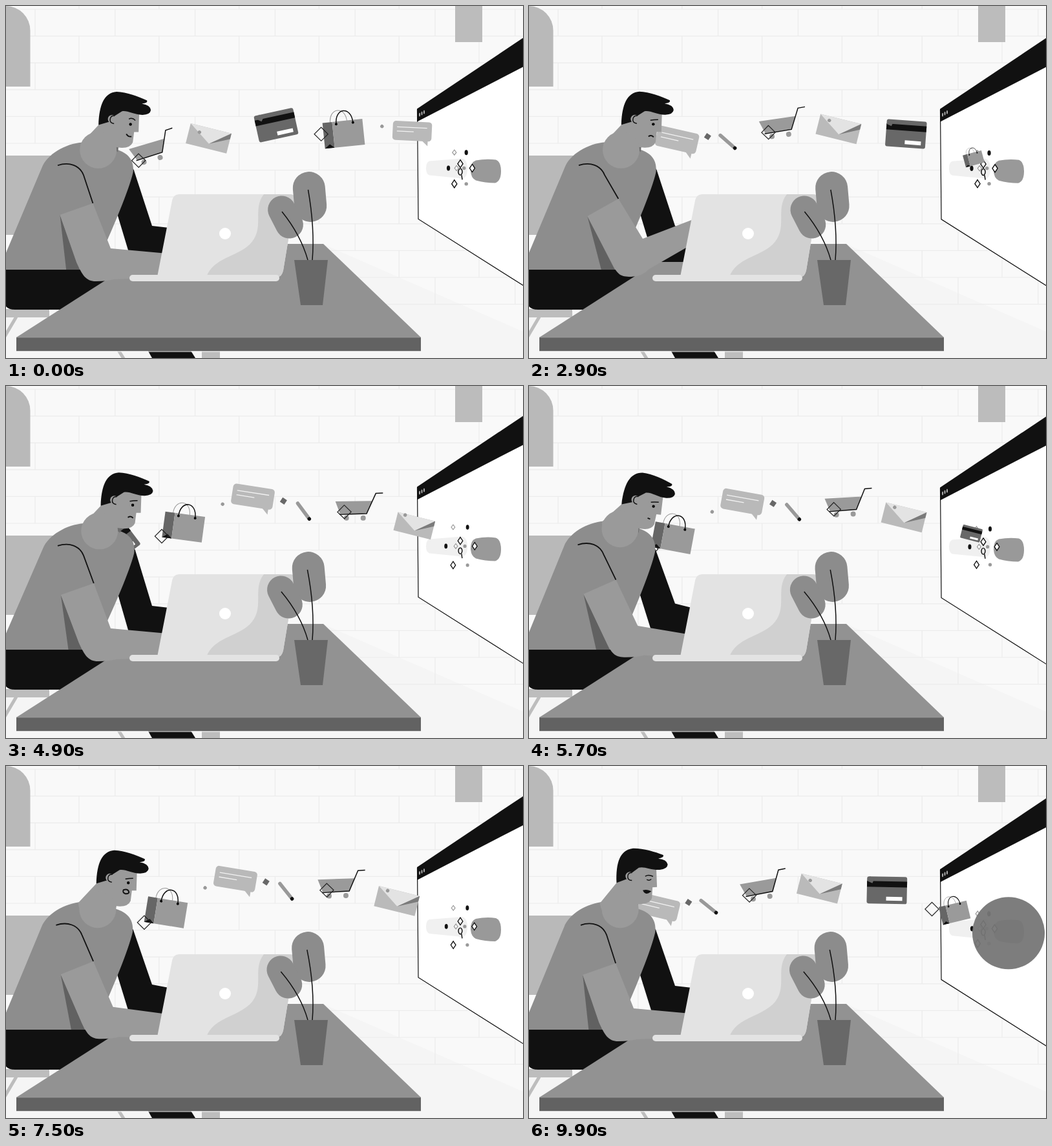
Recreate the animation shown at these times as an HTML page. Size 800x546 px, loop 10000 ms.

```html
<!DOCTYPE html>
<html lang="en">
<head>
<meta charset="utf-8">
<title>Shopping online</title>
<style>
html, body { margin: 0; width: 100%; height: 100%; overflow: hidden; background: #f9f9f9; }
svg { display: block; width: 800px; height: 546px; }
.ink { fill: none; stroke: #111; stroke-width: 1.5; }
.skin { fill: #9a9a9a; }
.shirt { fill: #8d8d8d; }
.leaf { fill: #8c8c8c; }
#mouth { stroke-width: 1.9; }
#mouth.grin { fill: #111; }
</style>
</head>
<body>
<svg viewBox="0 0 800 546">
  <defs>
    <g id="cart">
      <path d="M-37-8L20-11 12 9-29 11Z" fill="#9a9a9a"/>
      <path class="ink" d="M-30 12L12 9 25-23 36-24"/>
      <circle cx="-19" cy="17" r="4" fill="#9a9a9a"/><circle cx="7" cy="16" r="4" fill="#9a9a9a"/>
    </g>
    <g id="envelope">
      <path d="M-32-16H33V16H-32Z" fill="#bababa"/>
      <path d="M-32-16H33L3 8Z" fill="#e3e3e3"/>
      <path d="M33-16L3 8 33-7Z" fill="#7b7b7b"/>
    </g>
    <g id="card">
      <rect x="-31" y="-21" width="62" height="42" rx="3" fill="#686868"/>
      <path d="M-31-14H31V-5H-31Z" fill="#111"/>
      <path d="M-1 10H24V16H-1Z" fill="#fff"/>
    </g>
    <g id="bag">
      <path d="M-19-14C-19-38 7-38 7-14" fill="none" stroke="#999"/>
      <path d="M-31-15H-16V25H-31Z" fill="#666"/>
      <path d="M-16-15H31V25H-16Z" fill="#9a9a9a"/>
      <path d="M-31 25L-23 19-16 25Z" fill="#111"/>
      <path class="ink" d="M-10-11C-10-37 16-37 16-11"/>
      <circle cx="-10" cy="-11" r="2"/><circle cx="16" cy="-11" r="2"/>
    </g>
    <g id="bubble">
      <rect x="-33" y="-17" width="65" height="32" rx="5" fill="#b9b9b9"/>
      <path d="M16 14H26V23Z" fill="#b9b9b9"/>
      <path d="M-26-7H24M-26 0H2" stroke="#f2f2f2" stroke-width="1.3"/>
    </g>
    <g id="pencil">
      <path d="M-15 0H12" stroke="#999" stroke-width="5.5" stroke-linecap="round"/>
      <circle cx="15" r="2.8" fill="#111"/>
    </g>
    <rect id="square" x="-7.5" y="-7.5" width="15" height="15" fill="none" stroke="#222" stroke-width="1.2"/>
    <rect id="chip" x="-4" y="-4" width="8" height="8" fill="#686868"/>
    <circle id="dot" r="2.7" fill="#999"/>
    <path id="gem" d="M0-6L4 0 0 6-4 0Z" fill="#fff" stroke="#111" stroke-width="1.4"/>
    <path id="paleGem" d="M0-4L3 0 0 4-3 0Z" fill="#fff" stroke="#999" stroke-width="1.2"/>
    <ellipse id="bean" rx="2.6" ry="4" fill="#111"/>
    <path id="loop" class="ink" d="M0-6A3 5 0 1 1-.1-6M2 4L3 11"/>
  </defs>

  <rect width="800" height="546" fill="#f9f9f9"/>
  <path d="M490 369L800 505V546H0V475H600Z" fill="#f5f5f5"/>
  <path id="bricks" fill="none" stroke="#ececec" stroke-width="1.2"/>
  <path d="M0 0A37.500 38 0 0 1 37.500 38V125H0Z" fill="#b9b9b9"/>
  <path d="M695 0V56H737V0Q735-6 716-6T695 0Z" fill="#bcbcbc"/>
  <path d="M0 232H75Q82 232 82 240V355H0Z" fill="#b9b9b9"/>

  <g id="screen">
    <path d="M636.500 180L800 95V435L638 332Z" fill="#fff"/>
    <path d="M636 161L800 51V96L636 181Z" fill="#111"/>
    <path class="ink" style="stroke-width:1.2" d="M636.500 162L638 332 802 436"/>
    <g fill="#aaa"><ellipse cx="640" cy="170" rx="1.1" ry="3"/><ellipse cx="643.500" cy="168" rx="1.1" ry="3"/><ellipse cx="647" cy="166" rx="1.1" ry="3"/></g>
    <path d="M655 242L706 238Q714 240 714 254T706 269L655 264Q650 262 650 253T655 242Z" fill="#f0f0f0"/>
    <path d="M727 241Q743 238 758 240 766 243 766 258T757 276Q741 276 727 272 719 268 719 256T727 241Z" fill="#999"/>
    <g id="sparks"></g>
    <circle id="disc" cx="742" cy="260" fill="#777" opacity=".95"/>
  </g>
  <g id="stream"></g>

  <path d="M16 482L-4 516" stroke="#bdbdbd" stroke-width="5"/>
  <path d="M174 534L184 550" stroke="#bdbdbd" stroke-width="5"/>
  <path d="M0 470H67V483H0Z" fill="#bdbdbd"/>
  <path d="M303 530H331V546H303Z" fill="#bdbdbd"/>
  <path d="M217 530H283L293 546H226Z" fill="#111"/>
  <path d="M0 409H185L120 471H14Q4 471 0 466Z" fill="#111"/>
  <path d="M16 514L242 369H491L642 514Z" fill="#929292"/>
  <path d="M16 514H642V535.500H16Z" fill="#626262"/>
  <path d="M16 514H642" stroke="#a2a2a2" stroke-width=".7"/>
  <path d="M16 536H642" stroke="#fff"/>

  <path id="backArm" fill="#111"/>
  <path id="torso" class="shirt" d="M-11 409L55 250C63 230 90 213 118 211L170 222C190 228 198 240 196 258C190 285 165 345 150 378V409Z"/>
  <path id="shade" fill="#616161"/>
  <g id="head">
    <path d="M160 212L173 217 172 226 158 216Z" fill="#6d6d6d"/>
    <path class="skin" d="M144 182L114 214Q116 240 145 245L166 218Q190 223 195 211L197 195H204L205 164 180 155H160Z"/>
    <path d="M142 184C143 152 151 134 170 132.500C186 133 204 140 217 146Q219 150 209 151Q222 153 223 161Q222 168 210 168.500C196 168 186 161 178 163L167 170 159 179Z" fill="#111"/>
    <circle class="skin" cx="163" cy="175" r="6.500"/>
    <path class="ink" d="M167 170Q161 169 160 175T166 182"/>
    <circle id="eye" cx="191.500" cy="183" r="2.2"/>
    <path id="brow" class="ink"/>
    <path id="mouth" class="ink"/>
  </g>
  <circle id="collar" class="skin" cx="142" cy="223" r="28.500"/>
  <path id="arm" class="skin"/>
  <path id="seam" class="ink" style="stroke-width:1.8"/>

  <path d="M268 292H438Q449 292 447 301L429 410Q427 420 420 420H234L257 302Q259 292 268 292Z" fill="#e3e3e3"/>
  <path d="M399 292H438Q449 292 447 301L429 410Q427 420 420 420H310C322 390 355 390 377 370C402 345 380 316 399 292Z" fill="#d0d0d0"/>
  <rect x="191" y="417" width="232" height="10" rx="5" fill="#e3e3e3"/>
  <circle cx="339" cy="353" r="9" fill="#fff"/>

  <g id="leaves">
    <rect class="leaf" x="445" y="257" width="50" height="78" rx="25" transform="rotate(-5 470 296)"/>
    <rect class="leaf" x="411" y="293" width="43" height="69" rx="21.500" transform="rotate(-27 432.500 327.500)"/>
  </g>
  <path id="stems" class="ink"/>
  <path d="M446 394H498L490 464H456Z" fill="#686868"/>
</svg>
<script>
const LOOP = 10000, STEP = 100;
const LAP = 565, SPEED = .6415, LEFT = 142;

const $ = id => document.getElementById(id);
const set = (id, name, value) => $(id).setAttribute(name, value);
const use = (id, x, y, turn = 0, size = 1) =>
  `<use href="#${id}" transform="translate(${x} ${y}) rotate(${turn}) scale(${size})"/>`;

const clamp = x => Math.min(1, Math.max(0, x));
const smooth = (a, b, t) => { const u = clamp((t - a) / (b - a)); return u * u * (3 - 2 * u); };
const bump = (t, peak, reach) => 1 - smooth(0, reach, Math.abs(t - peak));
const random = seed => { const v = Math.sin(seed * 12.9898) * 43758.5453; return v - Math.floor(v); };

// Goods rise from behind the man, cross the room and shrink into the screen
const wrap = p => LEFT + ((p - LEFT) % LAP + LAP) % LAP;
const pathY = x => 184 + (x - 450) ** 2 / 1230;
const pathSize = x => Math.max(.15, Math.min(1, 1 - (x - 620) / 130));

// name, lead over the pencil, vertical offset, turn at x
const GOODS = [
  ["bubble", -78, -15, x => 7 - (x - 457) * .025],
  ["pencil", 0, 10, x => 40 + (x - 290) * .08],
  ["cart", 86, -3, x => (x - 500) * .05],
  ["envelope", 171, 6, () => 14],
  ["card", 276, 0, x => (x - 542) * .1],
  ["bag", 380, 5, x => (415 - x) * .055]
];

function drawStream(t) {
  const flow = LEFT + t * SPEED;
  let out = "";
  for (const [name, lead, dy, turn] of GOODS) {
    const x = wrap(flow + lead);
    out += use(name, x, pathY(x) + dy, turn(x), pathSize(x));
  }
  // One bit of confetti in each gap, the outlined squares hanging lower
  for (let i = 0; i < 6; i++) {
    const name = ["chip", "square", "dot"][i % 3];
    const x = wrap(flow - 31 + i * LAP / 6);
    const y = pathY(x) - 6 + (name === "square" ? 24 : 0) - random(i) * 12;
    if (x < 640) out += use(name, x, y, 20 + 25 * random(i + 9));
  }
  $("stream").innerHTML = out;
}

function drawScreen(t, bob) {
  set("screen", "transform", `translate(0 ${-.4 - 4.6 * bob})`);
  const spread = .9 + .3 * bob;
  const ring = (names, rx, ry) => names.map((name, i) => {
    const a = i * 2 * Math.PI / names.length;
    return use(name, 703 + rx * spread * Math.cos(a), 253 + ry * spread * Math.sin(a), 0, 1.3 - .3 * spread);
  }).join("");
  $("sparks").innerHTML = ring(["gem", "dot", "gem", "bean", "paleGem", "bean"], 19, 29) +
    ring(["dot", "loop", "paleGem", "gem"], 6, 7);
  set("disc", "r", Math.max(0, 56 - (LOOP - STEP - t) * .15));
}

const FROWN = "M184 202Q189 199 192 203", WORRIED = "M187 177Q192 176 199 176";
// end time, mouth, brow
const MOODS = [
  [700, "M185 198Q188 203 193 202", "M189 175Q194 172 199 177"],
  [5700, FROWN, WORRIED],
  [7500, "M184 202L188 203", WORRIED],
  [9300, "M184 194Q190 192 192 196T187 200Q182 198 184 194Z", WORRIED],
  [LOOP, "M183 199Q188 198 193 201 186 206 183 199Z", "M187 177Q192 174 199 178M189 182Q192 185 196 182"]
];

function drawFace(t) {
  const mood = MOODS.find(([end]) => t < end);
  const grin = mood[0] === LOOP;
  set("mouth", "d", mood[1]);
  set("brow", "d", mood[2]);
  $("mouth").classList.toggle("grin", grin);
  set("eye", "opacity", grin ? 0 : 1);
}

function drawMan(t, bob) {
  const lift = smooth(0, 1400, t) - smooth(3100, 4700, t);
  const nod = bump(t, 6500, 1500), back = bump(t, 8800, 2200);
  const push = Math.max(lift, nod);

  const bodyX = 3 * bob - 7 * nod - 2 * back, bodyY = 2 * bob - 6 * nod - back;
  // Shear keeps the waist in place while the shoulders lean
  const lean = bodyX / 185, rise = bodyY / 190;
  set("torso", "transform", `matrix(1 0 ${-lean} ${1 - rise} ${lean * 409} ${rise * 409})`);
  set("collar", "transform", `translate(${bodyX} ${bodyY})`);
  set("head", "transform", `translate(${5 * bob - 8 * nod - 11.5 * back} ${2 * bob - 3 * nod - 7 * back})` +
    `rotate(${11 * nod - 8 * back} 150 200)`);

  // Sleeve, elbow and hand of the near arm
  const lx = 83 + 7 * lift + 2 * bob, ly = 324 + 2 * lift - 3 * nod;
  const rx = 134 + 4 * lift + 2 * bob - 2 * nod, ry = 306 - 7 * lift - 12 * nod;
  const edge = 111 + 19 * push + 5 * bob, ex = edge + 27, ey = 427 - 7 * lift - 14 * nod;
  const hx = 250 + 12 * lift, hand = 384 - 56 * lift + 4 * nod;
  set("arm", "d", `M${lx} ${ly}L${edge - 3} 398C${edge + 6} 417 ${ex - 16} ${ey} ${ex} ${ey}` +
    `Q${ex + 17} ${ey} ${ex + 28} ${ey - 3 - 9 * lift}L${hx} ${hand + 36}V${hand}` +
    `L${162 + 14 * push} ${376 - 15 * lift - 9 * nod}L${rx} ${ry}Z`);
  set("shade", "d", `M${lx} ${ly}L${edge - 19} 409H${edge + 2}Z`);

  const sx = 80 - 3 * lift - 10 * nod, sy = 247 + bodyY / 2;
  set("seam", "d", `M${sx} ${sy}C${sx + 18} ${sy - 6} ${sx + 34} ${sy} ${sx + 40} ${sy + 15}L${rx} ${ry}`);
  set("backArm", "d", `M${186 + bodyX} 240L${197 + bodyX} 254L226 ${341 - 8 * nod}` +
    `L252 ${344 + 16 * lift}V397H205L190 382L${168 + bodyX / 2} 310Z`);
}

function drawPlant(sway) {
  set("leaves", "transform", `translate(${sway} 0)`);
  set("stems", "d", `M${467.5 + sway} 285Q478 345 474 394M${427 + sway} 319Q456 355 467 394`);
}

function draw(t) {
  const lap = t * SPEED / LAP;
  const bob = .5 + .5 * Math.cos(2 * Math.PI * (lap - .66));
  drawStream(t);
  drawScreen(t, bob);
  drawFace(t);
  drawMan(t, bob);
  drawPlant(-t / 4500);
}

function drawBricks() {
  let d = "";
  for (let row = -1; row < 11; row++) {
    const y = 5 + row * 41.6;
    d += `M0 ${y + 41.6}H800`;
    for (let x = row % 2 ? 113 : 45; x < 800; x += 123.8) d += `M${x} ${y}v41.6`;
  }
  set("bricks", "d", d);
}

drawBricks();
let shown = -1;
const start = performance.now();
function frame() {
  const t = Math.floor((performance.now() - start) % LOOP / STEP) * STEP;
  if (t !== shown) draw(shown = t);
  requestAnimationFrame(frame);
}
frame();
</script>
</body>
</html>
```
